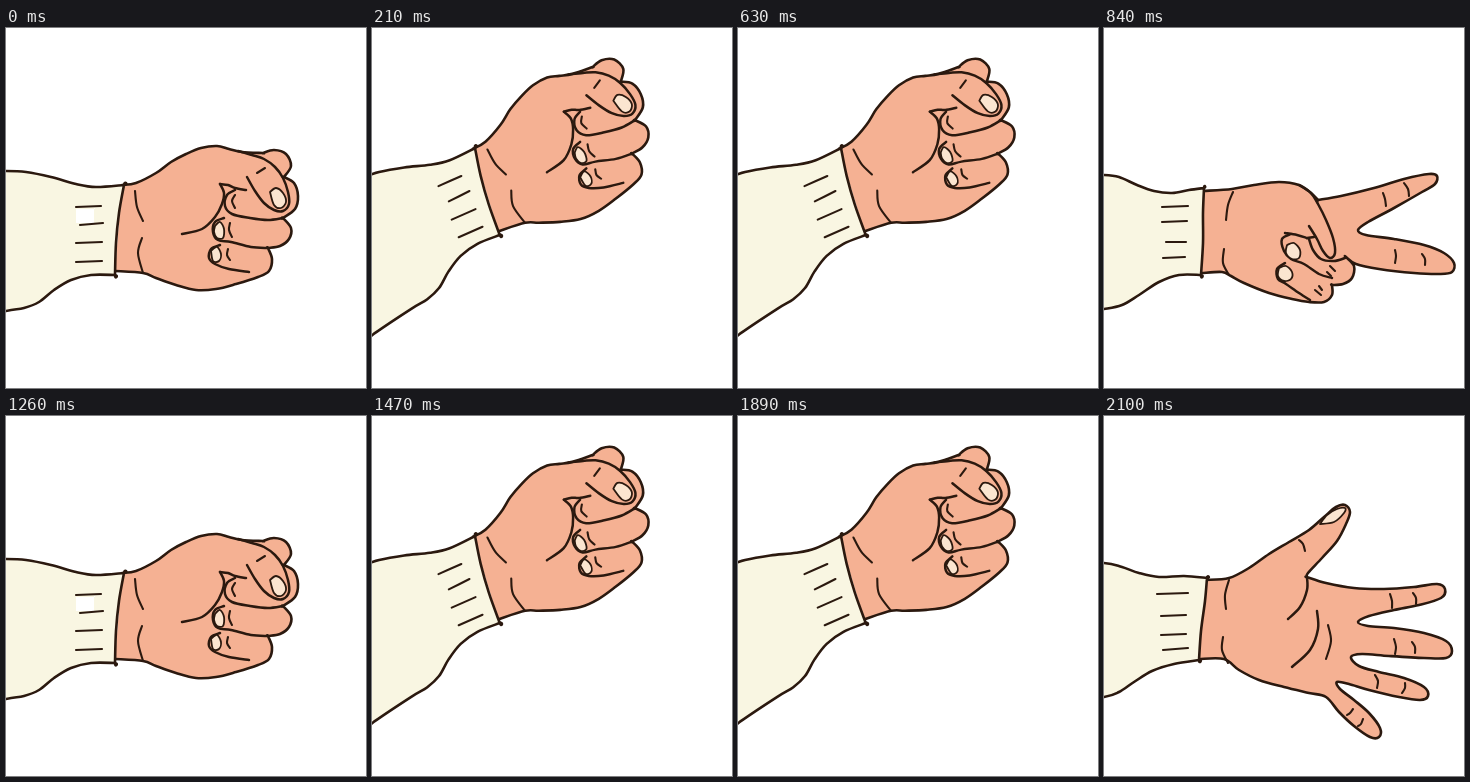
An HTML page that plays this animation: 360 by 360 pixels, repeating every 2520 ms.

```html
<!DOCTYPE html>
<html lang="en">
<head>
<meta charset="utf-8">
<title>Rock paper scissors</title>
<style>
  html, body { margin: 0; width: 100%; height: 100%; overflow: hidden; background: #fff; }
  svg { display: block; width: 100vw; height: 100vh; }
  path { fill: none; stroke: #2b190f; stroke-width: 2.1; stroke-linecap: round; stroke-linejoin: round; }
  .hand { fill: #f5b193; stroke-width: 2.6; }
  .bold { stroke-width: 2.5; }
  .sleeve { fill: #f9f6e2; stroke-width: 2.6; }
  .nail { fill: #fbe5d0; stroke-width: 1.8; }
  .patch { fill: #fff; stroke: none; }
</style>
</head>
<body>
<svg id="stage" viewBox="0 0 360 360"></svg>
<script>
// Points are "x,y" pairs; a repeated point makes a corner.
const poses = {
  rock: {
    hand: ['116,157 130,155 150,145 165,134 180,126 195,120 211,118 223,121 236,124 257,125 257,125 268,122 280,126 285,138 278,149 278,149 288,155 292,168 289,181 277,190 277,190 285,200 283,211 274,218 262,220 262,220 266,231 263,243 252,249 230,256 210,261 190,262 170,257 150,250 137,245 109,243'],
    bold: [
      '232,123 246,127 258,131 269,139 277,150 282,164 283,176 277,183 268,182 258,175 249,163 241,149',
      '214,156 218,165 216,176 209,189 196,201 176,206',
      '214,156 222,157 229,160 240,162',
      '229,162 221,167 219,178 226,186 244,190 262,192 277,190',
      '218,190 209,194 207,204 212,212 225,214 245,219 262,220',
      '214,217 205,221 203,230 209,236 223,241 243,244'
    ],
    line: ['129,163 131,179 137,193', '136,210 132,225 137,245', '251,145 259,140', '229,167 226,173 229,180', '224,195 223,202 226,209', '222,221 221,227 224,232'],
    nail: ['264,164 270,160 277,165 280,174 275,180 268,177 264,164', '209,198 214,194 218,201 217,210 211,210 208,204 209,198', '205,223 211,219 215,226 213,233 207,233 205,223'],
    sleeve: ['-70,147 -40,144 0,143 20,144 45,149 70,156 90,159 118,157 118,157 113,185 110,215 109,247 109,247 85,247 65,252 48,262 33,274 18,280 0,283 -42,292 -70,300'],
    patch: ['70,181 70,181 88,181 88,181 88,195 88,195 70,195 70,195'],
    ribs: ['70,179 95,178', '74,197 97,195', '70,215 96,214', '70,234 96,233']
  },
  scissors: {
    hand: ['100,163 128,161 150,157 175,154 195,157 207,165 214,172 214,172 237,168 270,160 300,151 325,146 333,148 331,156 318,164 290,180 264,194 254,202 262,207 290,211 320,217 340,225 350,235 348,244 336,246 310,245 275,241 252,236 242,229 242,229 250,238 248,250 239,256 228,257 228,257 228,267 220,274 205,274 188,271 165,265 140,255 127,248 118,244 98,245'],
    bold: [
      '195,157 207,165 214,176 222,192 229,210 231,225 226,230 219,223 213,211 205,198',
      '210,209 203,210 203,210 193,207 181,205',
      '205,211 209,222 217,231 230,233 241,230',
      '187,206 178,211 180,223 187,231 200,236 215,246 228,250',
      '181,235 173,241 174,251 182,256 195,265 206,272'
    ],
    line: ['129,164 124,177 122,192', '120,221 119,235 125,247', '279,165 281,171 282,178', '300,155 304,161 305,168', '291,222 292,228 291,235', '318,226 321,231 321,237', '226,238 231,243', '223,244 227,248', '211,262 217,267', '215,258 218,262'],
    nail: ['183,217 190,215 196,222 195,230 188,231 182,225 183,217', '175,240 182,238 188,244 187,251 180,253 174,248 175,240'],
    sleeve: ['-40,147 0,147 15,149 33,157 50,163 68,165 85,162 100,160 100,160 99,185 99,215 97,247 97,247 75,247 55,254 35,267 18,277 0,281 -40,286'],
    ribs: ['58,179 84,178', '58,194 83,193', '62,214 82,214', '59,230 81,229']
  },
  paper: {
    hand: ['102,164 125,162 145,152 165,138 185,126 205,114 220,101 232,91 241,89 246,96 242,108 233,125 218,142 204,157 203,161 203,161 222,167 250,172 280,173 310,171 333,168 341,173 337,182 315,189 290,194 265,200 254,206 264,210 290,212 320,217 342,225 348,235 342,242 320,242 285,240 258,238 247,241 255,250 275,256 300,262 320,271 324,280 316,284 295,281 265,274 245,268 233,266 236,273 250,284 265,297 276,312 275,321 266,321 250,310 235,296 222,281 205,277 180,271 155,264 135,254 120,243 95,243'],
    bold: ['203,161 203,174 196,191 184,203', '213,195 214,213 206,234 188,251'],
    line: ['125,164 121,179 122,193', '119,221 118,234 124,247', '224,209 227,225 222,243', '195,124 199,128 201,135', '286,178 288,185 288,192', '309,177 312,182 312,188', '290,223 292,231 291,238', '308,226 311,231 311,237', '271,259 274,265 273,272', '301,267 301,272 298,277', '249,293 246,297 243,299', '259,303 257,308 254,310'],
    nail: ['216,108 223,99 233,93 241,92 240,97 230,106 216,108'],
    sleeve: ['-40,147 0,147 18,151 35,157 55,161 80,160 103,162 103,162 101,185 97,215 95,244 95,244 70,248 48,255 30,266 15,276 0,281 -40,286'],
    ribs: ['53,178 84,177', '57,200 82,199', '57,219 82,218', '59,234 84,232']
  }
};

const order = ['hand', 'bold', 'line', 'nail', 'sleeve', 'patch', 'ribs'];
const closed = ['nail', 'patch'];
const raised = 'translate(103 120) rotate(-21.6) translate(-118 -157)';
const beats = ['rock', 'raised', 'rock', 'raised', 'scissors', 'scissors',
               'rock', 'raised', 'rock', 'raised', 'paper', 'paper'];
const beatLength = 210;

// Smooth curve through all points (Catmull-Rom as cubic Béziers).
function curve(text) {
  const p = text.split(' ').map(s => s.split(',').map(Number));
  const at = i => p[Math.max(0, Math.min(p.length - 1, i))];
  const handle = (i, sign) => at(i).map((v, k) => v + sign * (at(i + 1)[k] - at(i - 1)[k]) / 6);
  let d = 'M' + p[0];
  for (let i = 0; i < p.length - 1; i++) d += `C${handle(i, 1)} ${handle(i + 1, -1)} ${p[i + 1]}`;
  return d;
}

const groups = {};
for (const name in poses) {
  const paths = order.flatMap(part => (poses[name][part] || []).map(points =>
    `<path class="${part}" d="${curve(points)}${closed.includes(part) ? 'Z' : ''}"/>`));
  stage.insertAdjacentHTML('beforeend', `<g>${paths.join('')}</g>`);
  groups[name] = stage.lastElementChild;
}
const patch = stage.querySelector('.patch');

function draw() {
  const beat = beats[Math.floor(performance.now() / beatLength) % beats.length];
  const up = beat === 'raised';
  const shown = up ? 'rock' : beat;
  for (const name in groups) groups[name].style.display = name === shown ? '' : 'none';
  groups.rock.setAttribute('transform', up ? raised : '');
  patch.style.display = up ? 'none' : '';
  requestAnimationFrame(draw);
}
draw();
</script>
</body>
</html>
```
